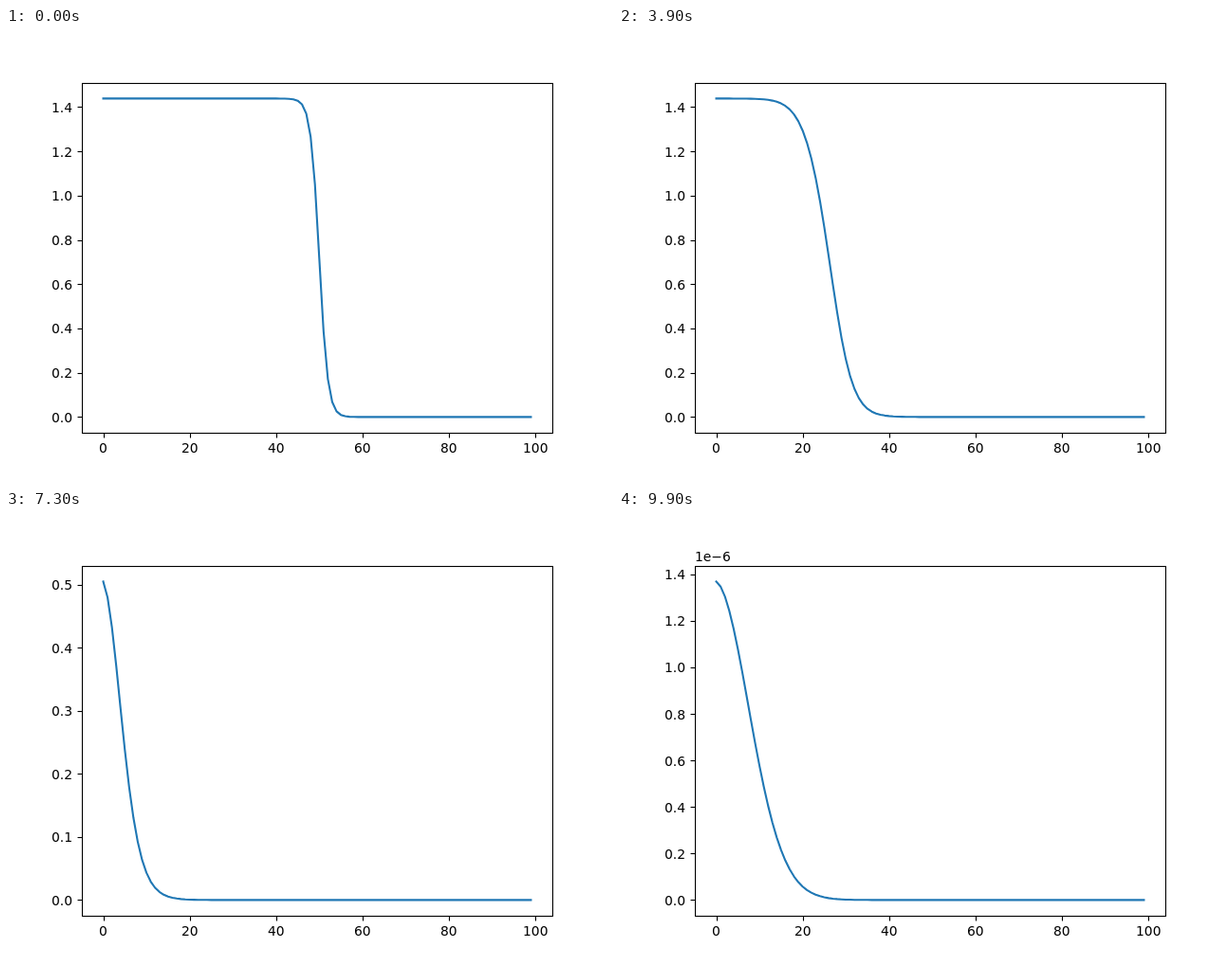
An HTML page with a canvas that plays this animation: 640x480 px, repeating every 10 s.

```html
<!DOCTYPE html>
<html lang="en">
<head>
<meta charset="utf-8">
<title>Collapsing front</title>
<style>
  html, body { margin: 0; width: 100%; height: 100%; overflow: hidden; background: #fff; }
  canvas { display: block; width: 640px; height: 480px; }
</style>
</head>
<body>
<canvas id="plot" width="640" height="480"></canvas>
<script>
const ctx = document.getElementById('plot').getContext('2d');
const PT = 100 / 72;
const BOX = { left: 80, right: 576, top: 57.6, bottom: 427.2 };
const CELLS = 100, FRAMES = 100, FRAME_MS = 100, SUBSTEPS = 10;

// Logistic growth with saturating predation, diffusing on a closed line.
const GROWTH = 0.5, CAPACITY = 8;
const THRESHOLD = (7 - Math.sqrt(17)) / 2;

function rate(u) {
  return u.map((v, i) => {
    const l = u[Math.max(i - 1, 0)];
    const r = u[Math.min(i + 1, CELLS - 1)];
    return l - 2 * v + r + GROWTH * v * (1 - v / CAPACITY) - v / (1 + v);
  });
}

const shift = (u, k, h) => u.map((v, i) => v + h * k[i]);

function rk4(u, h) {
  const a = rate(u);
  const b = rate(shift(u, a, h / 2));
  const c = rate(shift(u, b, h / 2));
  const d = rate(shift(u, c, h));
  return u.map((v, i) => v + h / 6 * (a[i] + 2 * b[i] + 2 * c[i] + d[i]));
}

function simulate() {
  let u = Float64Array.from({ length: CELLS }, (_, x) => THRESHOLD / (1 + Math.exp(x - 50)));
  const out = [u];
  while (out.length < FRAMES) {
    for (let s = 0; s < SUBSTEPS; s++) u = rk4(u, 1 / SUBSTEPS);
    out.push(u);
  }
  return out;
}

function niceStep(span) {
  const raw = span / 9;
  const scale = 10 ** Math.floor(Math.log10(raw));
  return scale * [1, 2, 2.5, 5, 10].find(s => s * scale >= raw * (1 - 1e-10));
}

function decimals(step) {
  let d = 0;
  while (d < 9 && Math.abs(step * 10 ** d - Math.round(step * 10 ** d)) > 1e-6) d++;
  return d;
}

function segment(x1, y1, x2, y2) {
  ctx.beginPath();
  ctx.moveTo(x1, y1);
  ctx.lineTo(x2, y2);
  ctx.stroke();
}

const snap = v => Math.round(v) + 0.5;

// align: 0 = left, 0.5 = centre, 1 = right
function label(text, x, baseline, align) {
  const left = x - align * ctx.measureText(text).width;
  ctx.fillText(text, Math.round(left), Math.round(baseline));
}

function drawXAxis(xPos) {
  for (let v = 0; v <= 100; v += 20) {
    const x = xPos(v);
    segment(snap(x), BOX.bottom, snap(x), 432.5);
    label(String(v), x, 447.9, 0.5);
  }
}

function drawYAxis(yPos, min, max) {
  const step = niceStep(max - min);
  const first = Math.ceil(min / step), last = Math.floor(max / step);
  const magnitude = Math.floor(Math.log10(last * step) + 1e-9);
  const order = magnitude <= -5 ? magnitude : 0;
  const unit = step / 10 ** order;
  const digits = decimals(unit);
  for (let k = first; k <= last; k++) {
    const y = yPos(k * step);
    segment(75.5, snap(y), BOX.left, snap(y));
    label((k * unit).toFixed(digits), BOX.left - 7 * PT, y + 5.5, 1);
  }
  if (order) label('1e\u2212' + -order, BOX.left, BOX.top - 3 * PT, 0);
}

function drawCurve(u, xPos, yPos) {
  ctx.strokeStyle = '#1f77b4';
  ctx.lineWidth = 1.5 * PT;
  ctx.lineJoin = 'round';
  ctx.lineCap = 'square';
  ctx.beginPath();
  u.forEach((v, i) => ctx.lineTo(xPos(i), yPos(v)));
  ctx.stroke();
}

function draw(u) {
  const lo = Math.min(...u), hi = Math.max(...u);
  const pad = 0.05 * (hi - lo), min = lo - pad, max = hi + pad;
  const xPad = 0.05 * (CELLS - 1);
  const xPos = v => BOX.left + (v + xPad) / (CELLS - 1 + 2 * xPad) * (BOX.right - BOX.left);
  const yPos = v => BOX.bottom - (v - min) / (max - min) * (BOX.bottom - BOX.top);

  ctx.fillStyle = '#fff';
  ctx.fillRect(0, 0, 640, 480);
  drawCurve(u, xPos, yPos);

  ctx.fillStyle = ctx.strokeStyle = '#000';
  ctx.lineWidth = 0.8 * PT;
  ctx.lineCap = 'butt';
  ctx.lineJoin = 'miter';
  ctx.font = 10 * PT + 'px "DejaVu Sans", sans-serif';
  drawXAxis(xPos);
  drawYAxis(yPos, min, max);
  ctx.strokeRect(80.5, 58.5, 496, 369);
}

const states = simulate();
const start = performance.now();

function tick() {
  const elapsed = Math.max(0, performance.now() - start);
  draw(states[Math.floor(elapsed / FRAME_MS) % FRAMES]);
  requestAnimationFrame(tick);
}
tick();
</script>
</body>
</html>
```
